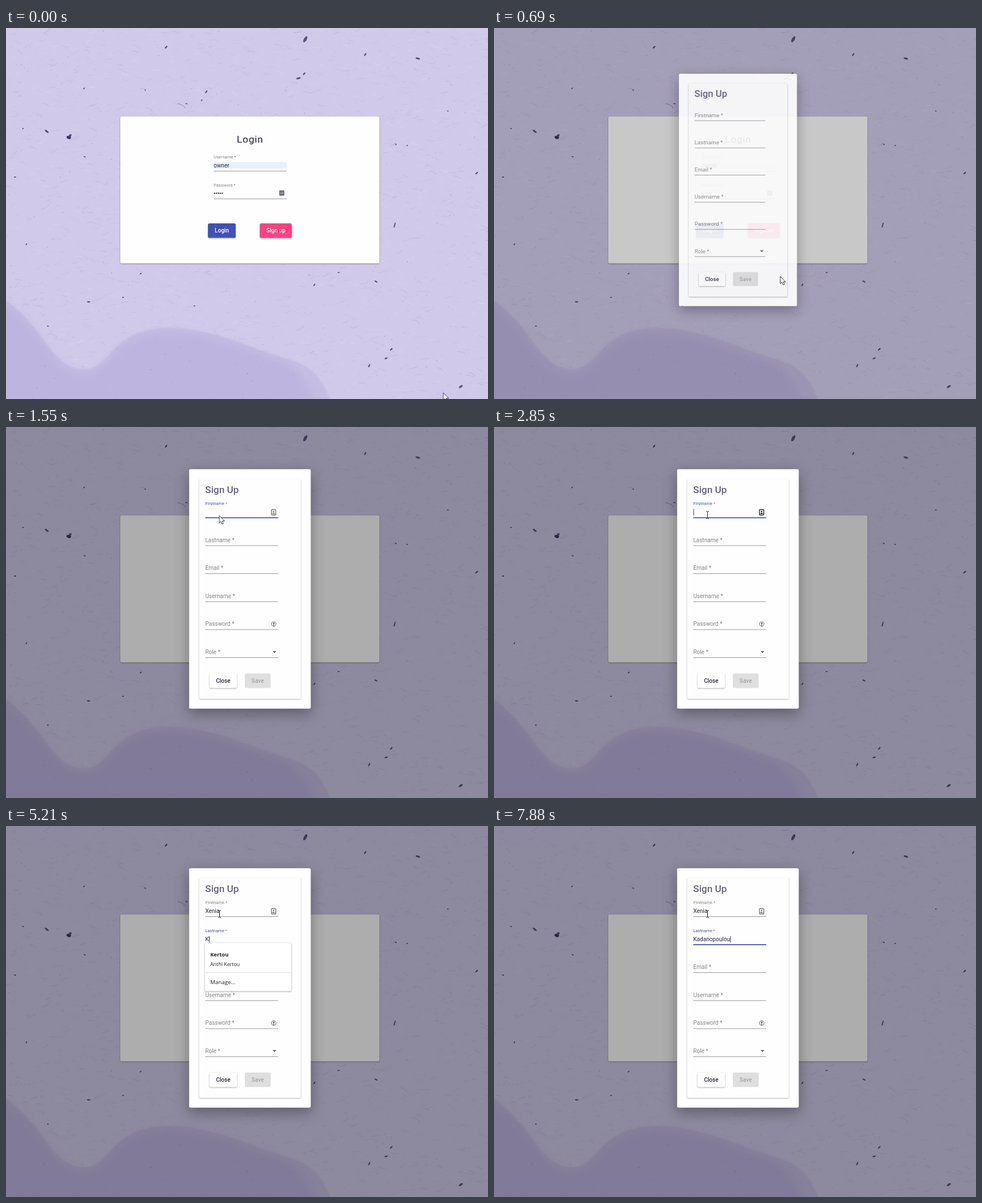
These frames come from a looping animation (852 px wide and 657 px high, 8 s). An HTML page with a canvas:

```html
<!DOCTYPE html>
<html lang="en">
<head>
<meta charset="utf-8">
<title>Sign up form</title>
<style>
  html, body { margin: 0; width: 100%; height: 100%; overflow: hidden; }
  canvas, svg { position: absolute; left: 0; top: 0; width: 852px; height: 657px; }
  text { font-family: Roboto, sans-serif; white-space: pre; }
  .menu text { font-family: "Open Sans", sans-serif; }
  .low { filter: drop-shadow(0 1px 1px rgba(0,0,0,.32)); }
  .high { filter: drop-shadow(0 8px 12px rgba(0,0,0,.34)); }
</style>
</head>
<body>
<canvas id="paper" width="852" height="657"></canvas>
<svg id="ui" viewBox="0 0 852 657"></svg>
<script>
const LOOP = 8000, SIZE = 10.1, BLUE = '#3f51b5', PINK = '#ff4081';
const ui = document.getElementById('ui');
const ctx = document.getElementById('paper').getContext('2d');

// ---- paper background ----
let seed = 11;
const rnd = (a = 0, b = 1) => {
  seed = (seed * 16807) % 2147483647;
  return a + (b - a) * seed / 2147483647;
};

const SPECKS = [
  [283,34,3], [529,20,6], [635,47,3], [728,54,4], [517,89,4], [527,81,3],
  [138,107,2], [246,110,1.5], [354,113,3], [319,134,2], [346,128,2], [72,183,4],
  [139,228,2], [30,178,1.5], [689,206,2], [832,257,3], [781,147,1.5], [709,208,1.5],
  [16,264,2], [238,435,2], [545,455,2.5], [654,449,3], [146,485,3], [207,477,1.5],
  [333,492,1.5], [74,528,1.5], [681,569,3], [642,598,3], [672,585,3], [804,635,4],
  [588,433,2], [36,383,2]
];

function blob(dx, dy) {
  ctx.beginPath();
  ctx.moveTo(-20, 470 + dy);
  ctx.bezierCurveTo(70, 520 + dy, 75, 604 + dy, 138, 604 + dy);
  ctx.bezierCurveTo(190, 604 + dy, 180, 531 + dy, 292, 531 + dy);
  ctx.bezierCurveTo(370, 533 + dy, 430, 566 + dy, 500, 587 + dy);
  ctx.bezierCurveTo(550 + dx, 602 + dy, 565 + dx, 630, 580 + dx, 680);
  ctx.lineTo(-20, 680);
  ctx.fill();
}

function drawPaper() {
  ctx.fillStyle = '#d0c9e9';
  ctx.fillRect(0, 0, 852, 657);
  for (let i = 0; i < 3000; i++) {
    const x = rnd(-10, 852), y = rnd(0, 657), l = rnd(3, 16), a = rnd(-.6, .6);
    ctx.strokeStyle = rnd() < .6 ? `rgba(125,115,180,${rnd(.04, .16)})` : `rgba(255,250,255,${rnd(.05, .18)})`;
    ctx.lineWidth = rnd(.5, 1.3);
    ctx.beginPath();
    ctx.moveTo(x, y);
    ctx.quadraticCurveTo(x + l / 2, y + rnd(-3, 3), x + l * Math.cos(a), y + l * Math.sin(a));
    ctx.stroke();
  }
  ctx.filter = 'blur(1px)';
  ctx.fillStyle = 'rgba(193,184,226,.7)';
  blob(0, 0);
  ctx.filter = 'blur(7px)';
  ctx.fillStyle = 'rgba(186,176,222,.65)';
  blob(-30, 9);
  ctx.filter = 'none';
  for (let i = 0; i < 500; i++) {
    ctx.fillStyle = `rgba(80,72,130,${rnd(.1, .45)})`;
    ctx.fillRect(rnd(0, 852), rnd(0, 657), rnd(.5, 1.6), rnd(.5, 1.4));
  }
  const oval = (x, y, rx, ry, a) => {
    ctx.beginPath();
    ctx.ellipse(x, y, rx, ry, a, 0, 7);
    ctx.fill();
  };
  ctx.fillStyle = 'rgba(58,52,98,.8)';
  for (const [x, y, r] of SPECKS) oval(x, y, r, Math.max(.9, r * .42), rnd(-1.1, .7));
  for (let i = 0; i < 7; i++) oval(111 + rnd(-3, 3), 192 + rnd(-3, 3), 2.6, 2, rnd(0, 3));
  oval(687, 349, 1, 5, .25);
  ctx.strokeStyle = 'rgba(80,72,130,.5)';
  ctx.lineWidth = 1;
  ctx.beginPath();
  ctx.moveTo(303, 134);
  ctx.quadraticCurveTo(313, 135, 317, 142);
  ctx.stroke();
}

// ---- timing ----
const clamp = v => Math.min(1, Math.max(0, v));

function bezier(x1, y1, x2, y2) {
  const at = (a, b, s) => 3 * (1 - s) * (1 - s) * s * a + 3 * (1 - s) * s * s * b + s * s * s;
  return p => {
    let lo = 0, hi = 1;
    for (let i = 0; i < 24; i++) {
      const mid = (lo + hi) / 2;
      if (at(x1, x2, mid) < p) lo = mid; else hi = mid;
    }
    return at(y1, y2, lo);
  };
}
const swift = bezier(.25, .8, .25, 1), decel = bezier(0, 0, .2, 1);
const run = (t, start, length, ease) => ease(clamp((t - start) / length));
const within = (t, a, b) => t >= a && t < b;

function stepped(t) {
  if (t < 1611) return Math.max(0, Math.floor((t + 6) / 77) * 77 - 6);
  if (within(t, 3950, 4740)) return 3950 + Math.floor((t - 3950) / 79) * 79;
  return t;
}

const OPEN = 597, TAB = 4230;
const FIRST = 'Xenia', LAST = 'Kadanopoulou';
const FIRST_KEYS = [3320, 3480, 3630, 3950, 4100];
const LAST_KEYS = [5210, 5370, 5440, 5520, 6470, 6630, 6860, 7020, 7330, 7570, 7720, 7880];
const CARET_OFF = [[1310, 1850], [2390, 2850], [4820, 5210], [6070, 6470]];
const MOUSE = [[0,773,646], [70,773,646], [450,489,362], [530,491,370], [610,503,433],
  [687,506,440], [920,506,440], [1080,495,415], [1534,377,157]];

const typed = (word, keys, t) => word.slice(0, keys.filter(k => k <= t).length);

function mouseAt(t) {
  const i = MOUSE.findIndex(m => m[0] > t);
  if (i < 0) return MOUSE[MOUSE.length - 1].slice(1);
  const [a, b] = [MOUSE[i - 1], MOUSE[i]];
  const p = (t - a[0]) / (b[0] - a[0]), s = p * p * (3 - 2 * p);
  return [a[1] + (b[1] - a[1]) * s, a[2] + (b[2] - a[2]) * s];
}

// ---- drawing helpers ----
const text = (x, y, s, size, fill, more = '') =>
  `<text x="${x}" y="${y}" font-size="${size}" fill="${fill}" ${more}>${s}</text>`;
const rect = (x, y, w, h, fill, more = '') =>
  `<rect x="${x}" y="${y}" width="${w}" height="${h}" fill="${fill}" ${more}/>`;
const button = (x, y, w, label, fill, ink, cls = 'low') =>
  rect(x, y, w, 25.6, fill, `rx="2.7" class="${cls}"`) +
  text(x + w / 2, y + 16.2, label, SIZE, ink, 'text-anchor="middle" font-weight="500"');
const textWidth = s => {
  ctx.font = `${SIZE}px Roboto, sans-serif`;
  return ctx.measureText(s).width;
};

function field(x, y, label, { float = 0, focus = 0, active = false, value = '', caret = false } = {}) {
  const ink = active ? BLUE : '#858585', star = active ? PINK : ink;
  let out = text(x, y - 6.4 - 15.6 * float, `${label} <tspan fill="${star}">*</tspan>`, SIZE * (1 - .25 * float), ink);
  out += rect(x, y - .3, 129, .9, '#8d8d92');
  if (focus) out += rect(x + 64.5 * (1 - focus), y - .5, 129 * focus, 1.7, BLUE);
  out += text(x, y - 6.4, value, SIZE, '#2c2838');
  if (caret) out += rect(x + .3 + textWidth(value), y - 15, 1, 11.5, '#34346c');
  return out;
}

function loginCard() {
  let dots = '';
  for (let i = 0; i < 5; i++) dots += `<circle cx="${368.6 + i * 3.4}" cy="292.6" r="1.2" fill="#2c2838"/>`;
  return rect(202, 156.7, 458, 260, '#fefefe', 'rx="2.7" class="low"') +
    text(408, 203, 'Login', 17.4, '#2a2140', 'letter-spacing=".8"') +
    rect(367, 237.5, 129, 11.5, '#e8f0fe') +
    field(367, 253.2, 'Username', { float: 1, value: 'owner' }) +
    field(367, 302.5, 'Password', { float: 1 }) + dots +
    rect(483, 287.5, 9, 9.5, '#77718c', 'rx="1"') +
    '<path d="M485 292.3h1m1 0h1m1 0h1" stroke="#fff" stroke-width="1.1"/>' +
    button(357, 346, 49, 'Login', BLUE, '#fff') +
    button(448.7, 346, 56.5, 'Sign up', PINK, '#fff');
}

function icons(t) {
  if (t < 1080) return '';
  const ink = within(t, 1850, TAB) ? '#222' : '#777';
  return `<rect x="469.2" y="146.3" width="7.6" height="9.4" rx="1" fill="none" stroke="${ink}" stroke-width="1.4"/>
    <circle cx="473" cy="149.6" r="1.4" fill="${ink}"/><path d="M470.5 154c0-3 5-3 5 0z" fill="${ink}"/>
    <circle cx="473.3" cy="348.8" r="4" fill="none" stroke="#777" stroke-width="1.1"/>
    <circle cx="473.3" cy="347.8" r="1.7" fill="#777"/><path d="M473.3 348v5.5" stroke="#777" stroke-width="1.4"/>`;
}

function menus(t) {
  const panel = (y, h) => rect(351.6, y, 152.9, h, '#fff', 'rx="2.5" class="low" stroke="#ddd" stroke-width=".5"');
  let out = '';
  if (within(t, FIRST_KEYS[0], TAB)) out = panel(157.3, 46) + text(361, 184, FIRST, 9.6, '#222');
  if (within(t, LAST_KEYS[0], LAST_KEYS[1])) {
    out = panel(207, 85.3) + text(361, 231.3, 'Kertou', 9.5, '#222', 'font-weight="700"') +
      text(361, 248.2, 'Anthi Kertou', 8.9, '#222') +
      rect(351.6, 259.5, 152.9, .9, '#d5d5d5') + text(361, 279.6, 'Manage...', 9.8, '#222');
  }
  return `<g class="menu">${out}</g>`;
}

function dialog(t) {
  const p = run(t, OPEN, 150, decel);
  if (!p) return '';
  const scale = .7 + .3 * p;
  const onLast = t >= TAB;
  const caret = !CARET_OFF.some(([a, b]) => within(t, a, b));
  const first = {
    float: run(t, 746, 400, swift), focus: onLast ? 0 : run(t, 712, 300, swift),
    active: !onLast && t >= 780, value: typed(FIRST, FIRST_KEYS, t), caret: caret && !onLast && t > 720
  };
  const last = {
    float: run(t, TAB, 400, swift), focus: run(t, TAB, 300, swift),
    active: onLast, value: typed(LAST, LAST_KEYS, t), caret: caret && onLast
  };
  const fields = ['Firstname', 'Lastname', 'Email', 'Username', 'Password', 'Role']
    .map((name, i) => field(352.2, 160.3 + 49.6 * i, name, [first, last][i])).join('');
  return `<g opacity="${p}" transform="translate(431.2 286.8) scale(${scale}) translate(-431.2 -286.8)">` +
    rect(323.7, 74.8, 215, 424, '#fff', 'rx="2.7" class="high"') +
    rect(341.5, 92, 179.7, 389.5, '#fefefe', 'rx="2.7" class="low"') +
    text(352, 117, 'Sign Up', 17.3, '#655f7d', 'font-weight="500"') + fields +
    '<path d="M471 396.8h7l-3.5 3.6z" fill="#666"/>' + icons(t) +
    button(359.7, 436.6, 48.5, 'Close', '#fff', '#2c2838') +
    button(422.2, 436.6, 45.6, 'Save', '#dfdfdf', '#a5a5a5', '') +
    menus(t) + '</g>';
}

function pointer(t) {
  if (t >= 1850) return '<path d="M375 149.5h1.6l.9.7.9-.7H380M377.5 150v11.5M375 162.2h1.6l.9-.7.9.7H380" fill="none" stroke="#222" stroke-width="1"/>';
  const [x, y] = mouseAt(t);
  return `<path transform="translate(${x} ${y})" d="M0 0V13L3 10.3L5.2 15L7.4 14L5.3 9.5H9.3Z" fill="#fff" stroke="#2a2535" stroke-width=".9"/>`;
}

function frame(now) {
  const t = stepped(now % LOOP);
  const shade = .32 * run(t, OPEN, 400, swift);
  ui.innerHTML = loginCard() + rect(0, 0, 852, 657, '#000', `opacity="${shade}"`) + dialog(t) + pointer(t);
  requestAnimationFrame(frame);
}

drawPaper();
requestAnimationFrame(frame);
</script>
</body>
</html>
```
